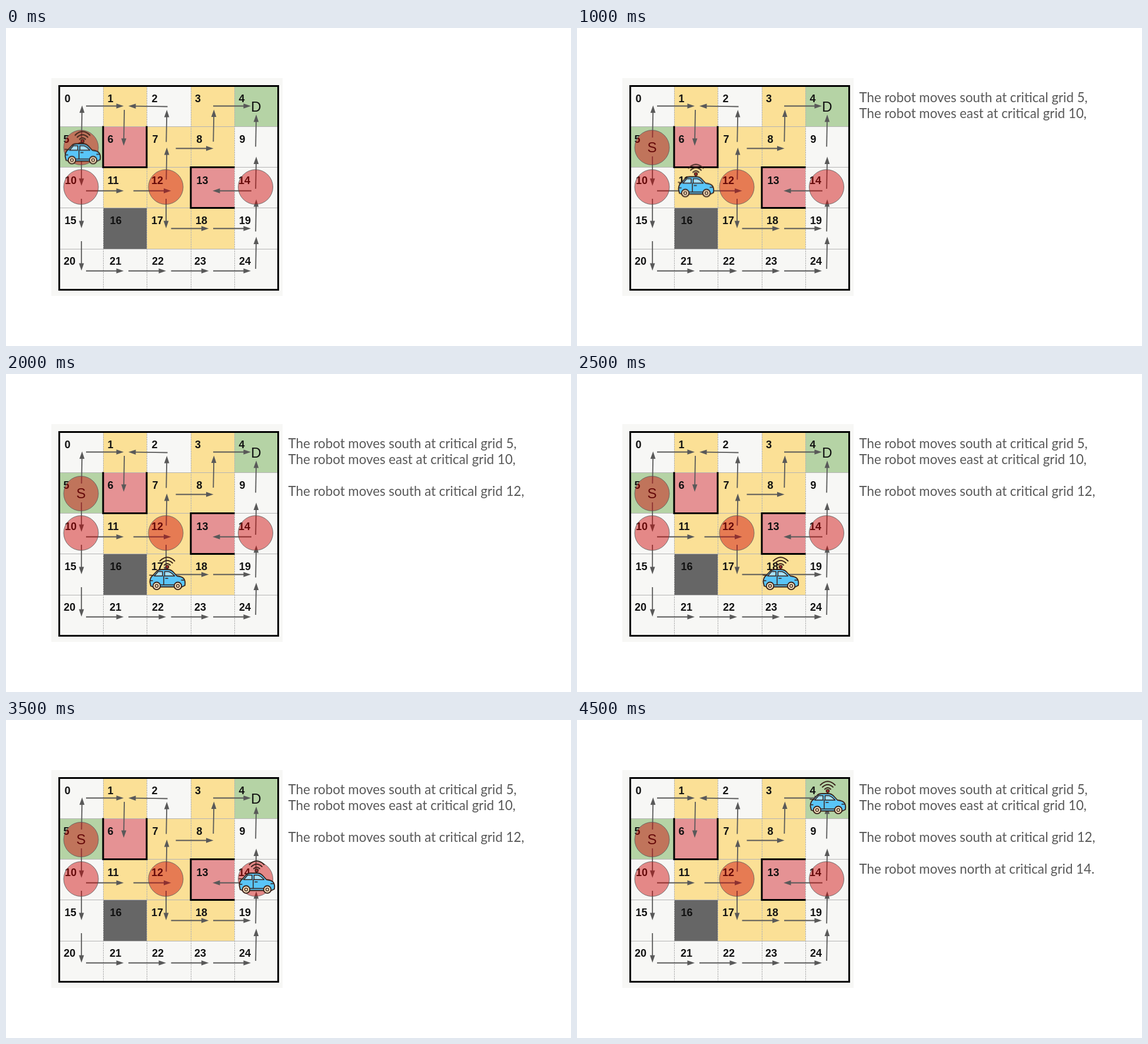
Recreate the animation shown at these times as an HTML page. Size 960x540 px, loop 5 s.

```html
<!DOCTYPE html>
<html lang="en">
<head>
<meta charset="utf-8">
<title>Robot grid route</title>
<style>
  html, body { margin: 0; width: 100%; height: 100%; overflow: hidden; background: #fff; }
  svg { display: block; width: 100%; height: 100%; }
  .label { font: bold 18px "Liberation Sans", Arial, sans-serif; fill: #111; }
  .mark { font: 24px "Liberation Sans", Arial, sans-serif; fill: #111; text-anchor: middle; }
  .log { font: 22.3px Lato, sans-serif; fill: #595959; }
  .arrow { stroke: #595959; stroke-width: 1.8; }
  .head { fill: #595959; }
  .grid { stroke: #b4b4b4; stroke-width: 1; fill: none; }
  .wall { stroke: #000; stroke-width: 3; fill: none; stroke-linecap: square; }
  .critical { fill: rgba(204, 0, 0, .45); stroke: #595959; stroke-opacity: .8; stroke-width: 1; }
  .car { animation: drive 5s step-end infinite; }
  .log text { animation: 5s step-end infinite; }
  .log text:nth-child(1) { animation-name: first; }
  .log text:nth-child(2) { animation-name: second; }
  .log text:nth-child(3) { animation-name: third; }
  .log text:nth-child(4) { animation-name: fourth; }
  @keyframes drive {
    0% { transform: translate(99px, 174.5px); }
    10% { transform: translate(99px, 231px); }
    20% { transform: translate(171px, 230.5px); }
    30% { transform: translate(243px, 230.5px); }
    40% { transform: translate(243px, 310px); }
    50% { transform: translate(315px, 310px); }
    60% { transform: translate(395px, 310px); }
    70% { transform: translate(395px, 238px); }
    80% { transform: translate(395px, 175px); }
    90%, 100% { transform: translate(395px, 103px); }
  }
  @keyframes first { 0% { opacity: 0; } 10%, 100% { opacity: 1; } }
  @keyframes second { 0% { opacity: 0; } 20%, 100% { opacity: 1; } }
  @keyframes third { 0% { opacity: 0; } 40%, 100% { opacity: 1; } }
  @keyframes fourth { 0% { opacity: 0; } 80%, 100% { opacity: 1; } }
</style>
</head>
<body>
<svg viewBox="0 0 960 540">
  <rect x="77" y="85" width="393" height="370" fill="#f7f7f5"/>
  <g id="cells"></g>
  <g id="lines" class="grid"></g>
  <path class="wall" d="M90.500 98.500H462.500V444.500H90.500Z"/>
  <path class="wall" d="M165 168V236.500H239V168M387 236.500H314V305.500H387"/>
  <g id="labels" class="label"></g>
  <g id="arrows"></g>
  <text class="mark" x="127.500" y="211">S</text>
  <text class="mark" x="425" y="141.500">D</text>
  <g class="critical">
    <circle cx="127.500" cy="203" r="29.500"/>
    <circle cx="127.500" cy="270" r="29.500"/>
    <circle cx="271.500" cy="270" r="29.500"/>
    <circle cx="424" cy="270" r="29.500"/>
  </g>
  <g class="car" stroke="#38221a" stroke-width="1.800" stroke-linecap="round" stroke-linejoin="round">
    <path fill="none" d="M18.500 7.500Q31 -5 43.500 7.500M22 11Q31 2.500 40 11M26 14.500Q31 9.500 36 14.500M31 20V22"/>
    <circle cx="31" cy="17.500" r="2.600" fill="#a52a2a" stroke-width="1.400"/>
    <path fill="#59c5f8" d="M3 50L1.500 43Q1.500 36 6 32.500L13 25Q16 22 21 22H32Q37 22 41 26L47.500 33Q57 34 59.500 38Q62 42 61 49L56 51.500H7Z"/>
    <path fill="#a6e0fa" stroke-width="1.500" d="M9 33L15.500 25.500H23V33ZM26.500 25.500H33Q37 26 43.500 33H26.500Z"/>
    <path fill="none" stroke-width="1.500" d="M1 31.500L8 32M25 33V48M28 37H32M55 40H60M2 41H6M20 48H42"/>
    <g fill="#f3dcb9">
      <circle cx="13" cy="49.800" r="6.300"/>
      <circle cx="49" cy="49.800" r="6.300"/>
      <circle cx="13" cy="49.800" r="2.500" stroke-width="1.300"/>
      <circle cx="49" cy="49.800" r="2.500" stroke-width="1.300"/>
    </g>
  </g>
  <g class="log">
    <text x="479.500" y="125.500">The robot moves south at critical grid 5,</text>
    <text x="479.500" y="152.500">The robot moves east at critical grid 10,</text>
    <text x="479.500" y="206.500">The robot moves south at critical grid 12,</text>
    <text x="479.500" y="260.500">The robot moves north at critical grid 14.</text>
  </g>
</svg>
<script>
  const cols = [91, 165, 239, 314, 388, 462];
  const rows = [98, 167, 236, 305, 375, 444];

  function add(parentId, tag, attrs, text = "") {
    const node = document.createElementNS("http://www.w3.org/2000/svg", tag);
    for (const key in attrs) node.setAttribute(key, attrs[key]);
    node.textContent = text;
    document.getElementById(parentId).append(node);
  }

  const fills = {
    "#fbe096": [1, 3, 7, 8, 11, 12, 17, 18],
    "#e59294": [6, 13],
    "#b5d3a5": [4, 5],
    "#666": [16]
  };
  for (const fill in fills) {
    for (const cell of fills[fill]) {
      const c = cell % 5, r = Math.floor(cell / 5);
      add("cells", "rect", {
        x: cols[c], y: rows[r], fill,
        width: cols[c + 1] - cols[c], height: rows[r + 1] - rows[r]
      });
    }
  }

  for (let i = 1; i < 5; i++) {
    add("lines", "path", { d: `M${cols[i] + .5} 98V444`, "stroke-dasharray": "3 1" });
    add("lines", "path", { d: `M91 ${rows[i] + .5}H462` });
  }

  const labelX = [
    99.5, 172.5, 247.5, 321, 395.5,
    97.5, 172.5, 248.5, 323.5, 396.5,
    100, 172.5, 247, 323.5, 395,
    99.5, 176.5, 247, 322, 396,
    98, 176, 248, 320, 396
  ];
  const labelY = [125.5, 194.5, 264.5, 332.5, 401.5];
  labelX.forEach((x, i) => add("labels", "text", { x, y: labelY[Math.floor(i / 5)] }, i));

  function arrow(x1, y1, x2, y2) {
    const angle = Math.atan2(y2 - y1, x2 - x1);
    add("arrows", "line", {
      class: "arrow", x1, y1,
      x2: x2 - 10 * Math.cos(angle), y2: y2 - 10 * Math.sin(angle)
    });
    add("arrows", "path", {
      class: "head", d: "M0 0L-12.500 -4.300V4.300Z",
      transform: `translate(${x2} ${y2}) rotate(${angle * 180 / Math.PI})`
    });
  }

  const right = (y, ...starts) => starts.forEach(x => arrow(x, y, x + 64, y));
  const up = (x, ...starts) => starts.forEach(y => arrow(x, y, x + 1, y - 54.5));
  const down = (x, ...starts) => starts.forEach(y => arrow(x, y, x, y + 50));

  right(132.5, 136, 352);
  right(204.5, 288.5);
  right(276.5, 136, 216.5);
  right(340.5, 280.5, 352);
  right(412.5, 136, 208, 280.5, 352);
  up(128.3, 186);
  up(272.3, 193.5, 257.5);
  up(352.3, 193);
  up(424.2, 201.5, 273, 345.5, 409);
  down(128.2, 218, 290, 362);
  down(272, 290);
  arrow(274.5, 133.5, 208, 132.5);
  arrow(201, 139, 200, 200);
  arrow(417, 276.5, 351, 276.5);
</script>
</body>
</html>
```
